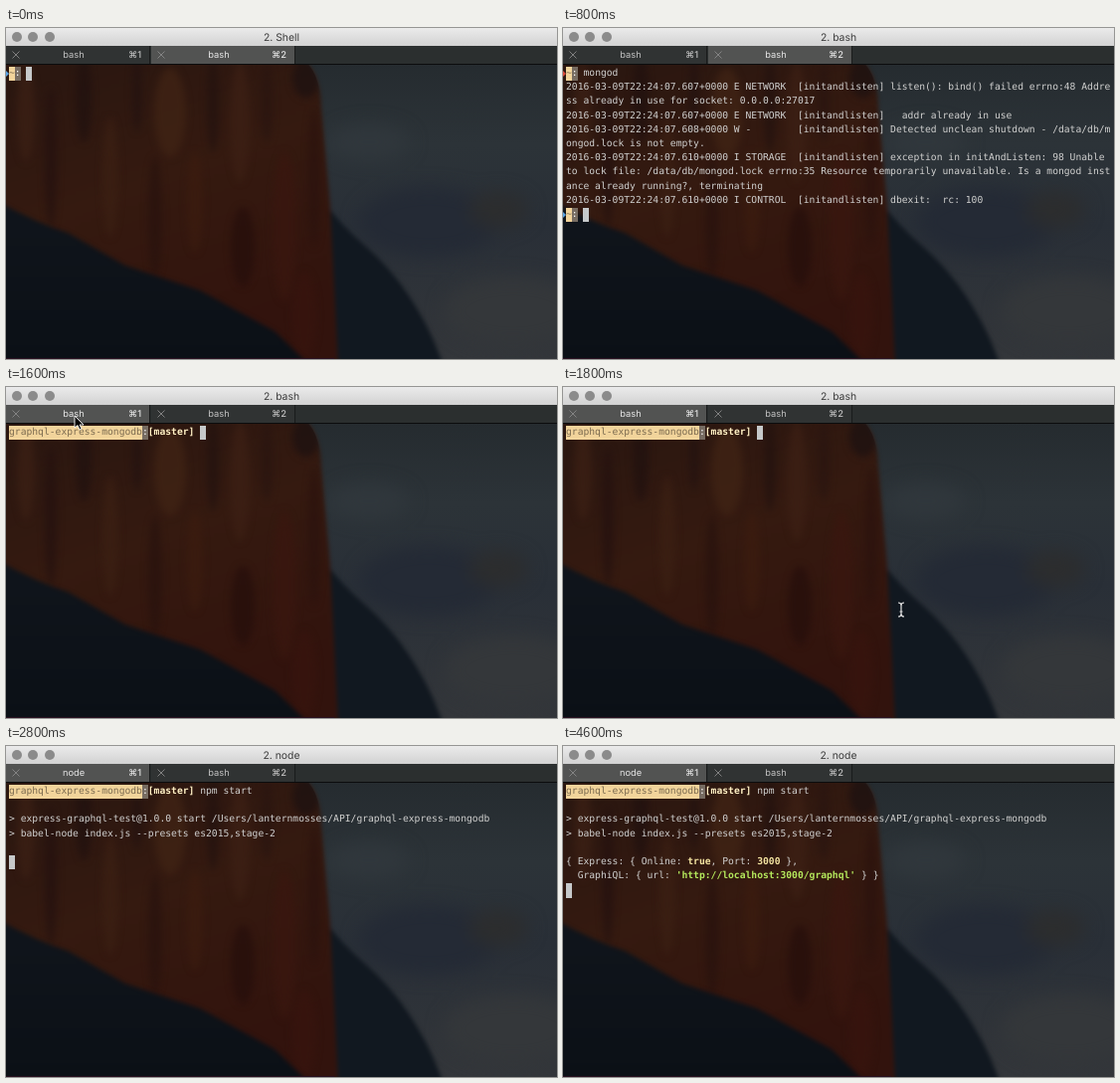
An HTML page that plays this animation: 554 px wide and 333 px high, repeating every 4800 ms.

```html
<!DOCTYPE html>
<html lang="en">
<head>
<meta charset="utf-8">
<title>Terminal</title>
<style>
html, body { margin: 0; width: 100%; height: 100%; overflow: hidden; background: #14171c; }
#stage { position: relative; width: 554px; height: 333px; overflow: hidden; font-family: Inter, "DejaVu Sans", sans-serif; text-rendering: geometricPrecision; }
svg { position: absolute; left: 0; top: 0; }
filter { color-interpolation-filters: sRGB; }
#title { position: absolute; inset: 0 0 auto; height: 18px; background: linear-gradient(#ebebeb, #d2d2d2); color: #3c3c3c; font-size: 10.4px; line-height: 20px; text-align: center; }
#title i { position: absolute; top: 4px; width: 10px; height: 10px; border-radius: 50%; background: #8b8b8b; }
#bar { position: absolute; top: 18px; width: 554px; height: 18px; background: #2b2f2f; border-bottom: 1px solid #0b0c0d; }
.tab { position: absolute; top: 0; width: 145px; height: 18px; box-sizing: border-box; border-right: 1px solid #191b1b; background: #303333; color: #c2c2c2; font-size: 9.3px; line-height: 20px; }
.tab.on { background: #525352; color: #e6e6e6; }
.tab span { position: absolute; left: 38px; width: 60px; text-align: center; }
.tab b { position: absolute; right: 8px; font-weight: 500; }
.tab svg { left: 6px; top: 5px; }
#term { position: absolute; left: 3px; top: 39px; margin: 0; color: #d0d0cf; font: 9.685px/14.2px "DejaVu Sans Mono", monospace; white-space: pre; }
#term span { display: inline-block; height: 14.2px; vertical-align: top; }
#term .dir { background: #f2d49b; color: #7d6c50; }
#term .sep { background: #776c62; color: #fff; }
#term .cur { width: 5.83px; background: #c6c9ca; }
.git, .num, .str { font-weight: bold; }
.git { color: #fff0c4; }
.num { color: #f3e3a0; }
.str { color: #b4e85c; }
.mark { position: absolute; left: -3px; margin-top: 4px; border: solid transparent; border-width: 3px 0 3px 3px; border-left-color: #5aa5e8; }
.mark.bad { border-left-color: #dd4a3a; }
</style>
</head>
<body>
<div id="stage">
  <svg width="554" height="333">
    <defs>
      <linearGradient id="sky" x2="0" y2="1">
        <stop offset=".1" stop-color="#252b2f"/><stop offset=".35" stop-color="#2c3338"/>
        <stop offset=".6" stop-color="#292f37"/><stop offset="1" stop-color="#33363a"/>
      </linearGradient>
      <linearGradient id="rock" x2=".4" y2="1">
        <stop offset=".1" stop-color="#2b1710"/><stop offset=".5" stop-color="#351a10"/>
        <stop offset="1" stop-color="#32130d"/>
      </linearGradient>
      <linearGradient id="slope" x2="0" y2="1">
        <stop offset="0" stop-color="#10151c"/><stop offset="1" stop-color="#0b1016"/>
      </linearGradient>
      <filter id="soft"><feGaussianBlur stdDeviation="2"/></filter>
      <filter id="smear"><feGaussianBlur stdDeviation="3.5"/></filter>
      <filter id="haze" x="-50%" y="-50%" width="200%" height="200%"><feGaussianBlur stdDeviation="9"/></filter>
      <clipPath id="cliff"><path d="M0 30H296Q316 42 317 80L326 180L334 333H0Z"/></clipPath>
    </defs>
    <rect width="554" height="333" fill="url(#sky)"/>
    <g filter="url(#haze)">
      <ellipse cx="425" cy="195" rx="70" ry="35" fill="#242a35"/>
      <ellipse cx="495" cy="183" rx="30" ry="18" fill="#2c2d2e"/>
      <ellipse cx="365" cy="115" rx="40" ry="18" fill="#30373c"/>
      <ellipse cx="510" cy="285" rx="70" ry="35" fill="#34373a"/>
    </g>
    <g filter="url(#soft)">
      <path d="M318 172Q336 198 362 220Q414 266 440 340H318Z" fill="#111820"/>
      <path d="M-9 30H296Q316 42 317 80L326 180L334 340H-9Z" fill="url(#rock)"/>
    </g>
    <g id="streaks" clip-path="url(#cliff)"><g filter="url(#smear)"></g></g>
    <path d="M-9 174Q30 196 62 206L120 239L195 264L270 305L306 340H-9Z" fill="url(#slope)" filter="url(#soft)"/>
    <path d="M0 332.5H330" stroke="#28101f"/>
  </svg>
  <div id="title"><i style="left:6px"></i><i style="left:22px"></i><i style="left:39px"></i><span></span></div>
  <div id="bar"></div>
  <pre id="term"></pre>
  <svg width="554" height="333">
    <path id="arrow" d="M0 0V12L3 9.5L5 14L7 13L5 9H9Z" fill="#000" stroke="#fff" stroke-width=".9"/>
    <path id="beam" d="M-3-7Q0-7 0-4Q0-7 3-7M0-4V4M-3 7Q0 7 0 4Q0 7 3 7M-1.5 2H1.5" fill="none" stroke="#e4e4e4" stroke-width="1.2"/>
  </svg>
</div>
<script>
const $ = s => document.querySelector(s);

// x, y, half width, half height, colour
const streaks = [
  [20, 85, 9, 50, '#3b2014'], [45, 130, 6, 70, '#261210'], [78, 70, 8, 45, '#22120f'],
  [105, 150, 8, 60, '#3b2013'], [132, 65, 5, 40, '#241310'], [165, 85, 16, 45, '#402315'],
  [150, 190, 7, 60, '#2a130e'], [190, 175, 8, 50, '#3b1c10'], [208, 75, 6, 50, '#25130f'],
  [235, 95, 10, 60, '#3c2014'], [238, 220, 12, 40, '#27100c'], [262, 75, 6, 40, '#2a1510'],
  [280, 200, 12, 75, '#3a170f'], [302, 50, 14, 20, '#1f1211'], [310, 150, 6, 70, '#2c130e'],
  [300, 290, 12, 45, '#37150e']
];
$('#streaks g').innerHTML = streaks.map(([x, y, w, h, c]) =>
  `<ellipse cx="${x}" cy="${y}" rx="${w}" ry="${h}" fill="${c}" opacity=".8"/>`).join('');

const tag = (cls, s = '') => `<span class="${cls}">${s}</span>`;
const cursor = tag('cur', ' ');
const home = bad => `<i class="mark${bad ? ' bad' : ''}"></i>${tag('dir', '~')}${tag('sep', ':')} `;
const repo = tag('dir', 'graphql-express-mongodb') + tag('sep', ':') + tag('git', '[master]') + ' ';
const entry = (ms, kind, msg) =>
  `2016-03-09T22:24:07.${ms}+0000 ${kind.padEnd(11)}[initandlisten] ${msg}`;

const failed = [
  home(true) + 'mongod',
  entry(607, 'E NETWORK', 'listen(): bind() failed errno:48 Addre'),
  'ss already in use for socket: 0.0.0.0:27017',
  entry(607, 'E NETWORK', '  addr already in use'),
  entry(608, 'W -', 'Detected unclean shutdown - /data/db/m'),
  'ongod.lock is not empty.',
  entry(610, 'I STORAGE', 'exception in initAndListen: 98 Unable'),
  'to lock file: /data/db/mongod.lock errno:35 Resource temporarily unavailable. Is a mongod inst',
  'ance already running?, terminating',
  entry(610, 'I CONTROL', 'dbexit:  rc: 100'),
  home()
].join('\n');

const started = [
  repo + 'npm start', '',
  '&gt; express-graphql-test@1.0.0 start /Users/lanternmosses/API/graphql-express-mongodb',
  '&gt; babel-node index.js --presets es2015,stage-2', '', ''
].join('\n');

const online = `{ Express: { Online: ${tag('num', 'true')}, Port: ${tag('num', '3000')} },
  GraphiQL: { url: ${tag('str', "'http://localhost:3000/graphql'")} } }
`;

function screen(n) {
  if (n < 4) return home() + 'mongod'.slice(0, [0, 3, 5, 6][n]);
  if (n < 8) return failed;
  if (n < 13) return repo + 'npm start'.slice(0, [0, 5, 9][Math.max(0, n - 10)]);
  if (n < 14) return repo + 'npm start\n';
  return started + (n < 18 ? '' : online);
}

const tab = (i, name, on) => `<div class="tab${on ? ' on' : ''}" style="left:${i * 146}px">
  <svg width="8" height="8"><path d="M.5.5l7 7m0-7l-7 7" stroke="#8a8a8a" stroke-width=".9"/></svg>
  <span>${name}</span><b>⌘${i + 1}</b></div>`;

function place(id, x, y, shown) {
  $(id).setAttribute('transform', `translate(${x} ${y})`);
  $(id).style.display = shown ? '' : 'none';
}

let last = -1;
function draw() {
  const n = Math.floor(performance.now() % 4800 / 200);
  if (n !== last) {
    last = n;
    const job = n < 14 ? 'bash' : 'node';
    $('#title span').textContent = '2. ' + (n ? job : 'Shell');
    $('#bar').innerHTML = tab(0, job, n >= 8) + tab(1, 'bash', n < 8);
    $('#term').innerHTML = screen(n) + cursor;
    place('#arrow', 69, 29, n > 5 && n < 9);
    const [x, y] = n < 6 ? [482, 167] : n < 10 ? [340, 224] : [310, 247];
    place('#beam', x, y, n === 5 || n > 8 && n < 12);
  }
  requestAnimationFrame(draw);
}
draw();
</script>
</body>
</html>
```
